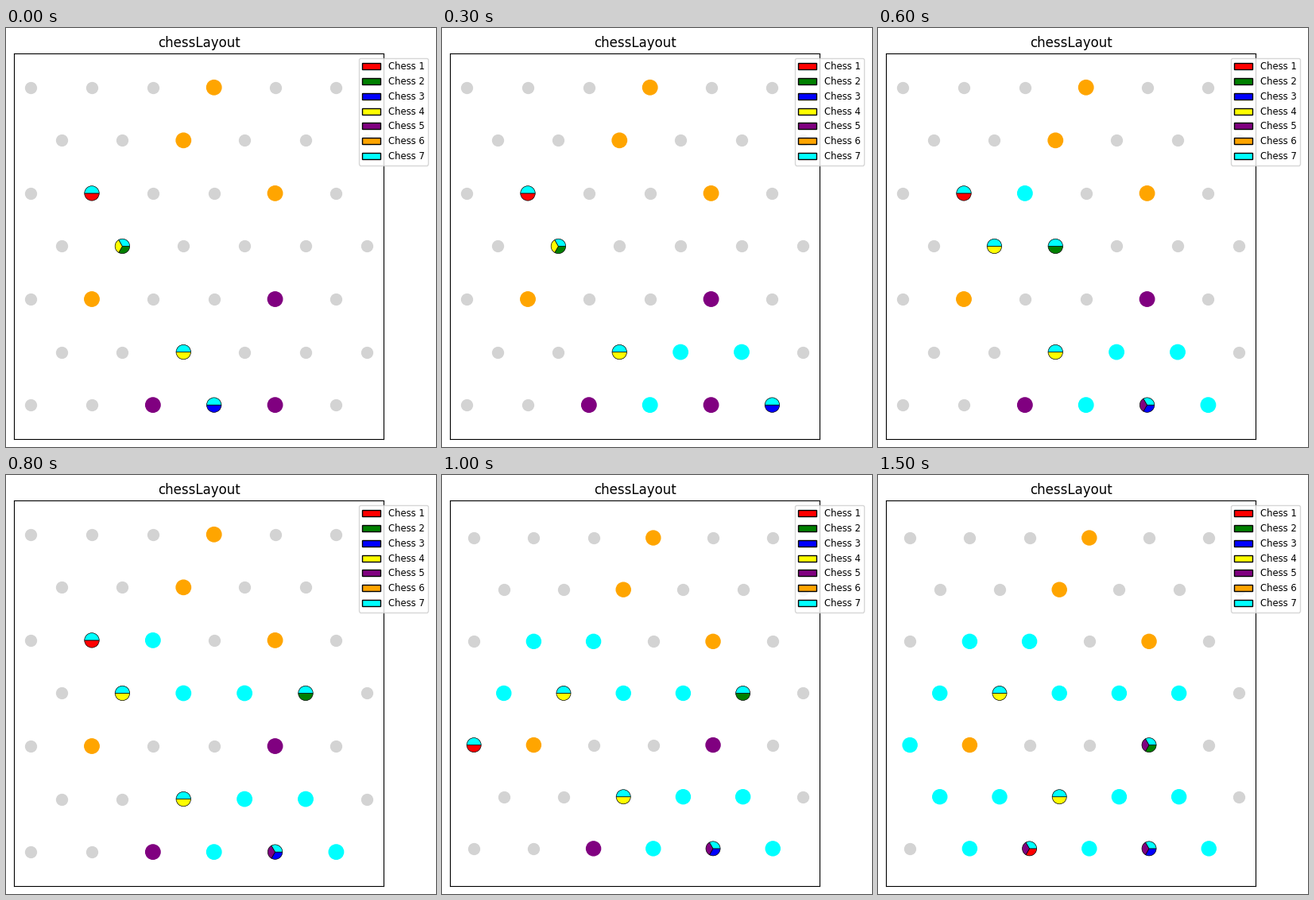
Animation of 541 by 527 pixels, one loop 1600 ms. Source, as a matplotlib script:

```python
import math

import matplotlib.pyplot as plt
from matplotlib.animation import FuncAnimation
from matplotlib.patches import Circle, Patch, Wedge

W, H, DPI = 541, 527, 100
AX_W, AX_H = 465, 485.1
COLS, ROWS = 6, 7
ROW_STEP = math.sqrt(3) / 2
RADIUS = 0.12
STEPS, STEP_MS = 16, 100
COLORS = ["red", "green", "blue", "yellow", "purple", "orange", "cyan"]
TRAIL = 7
TURN = 4  # most moves a piece makes before the next one goes

# Cells are (x, row); x counts columns, with odd rows shifted by a half.
HEADING = {"E": (1, 0), "W": (-1, 0),
           "NE": (0.5, 1), "SE": (0.5, -1), "SW": (-0.5, -1)}
FIXED = {
    4: [(1.5, 3), (2.5, 1)],
    5: [(2, 0), (4, 0), (4, 2)],
    6: [(3, 6), (2.5, 5), (4, 4), (1, 2)],
}
START = {3: (3, 0), 2: (1.5, 3), 1: (1, 4)}
ROUTES = {3: "NE E SE W", 2: "NE SE E E SW", 1: "SW SW SE E SW E"}


def move_list():
    """Let the pieces take turns until every route is used up."""
    left = {piece: route.split() for piece, route in ROUTES.items()}
    moves = []
    while any(left.values()):
        for piece, route in left.items():
            moves += [(piece, HEADING[name]) for name in route[:TURN]]
            left[piece] = route[TURN:]
    return moves


MOVES = move_list()


def board_at(step):
    """Map each occupied cell to the set of pieces on it."""
    pos = dict(START)
    trail = set(START.values()) | set(FIXED[4])
    for piece, (dx, dy) in MOVES[:step]:
        x, row = pos[piece]
        pos[piece] = (x + dx, row + dy)
        trail.add(pos[piece])
    board = {cell: {TRAIL} for cell in trail}
    for piece, cells in FIXED.items():
        for cell in cells:
            board.setdefault(cell, set()).add(piece)
    for piece, cell in pos.items():
        board[cell].add(piece)
    return board


def fit_view(board):
    left = min(0, min(x for x, _ in board) - RADIUS)
    right = COLS - 0.5
    pad = 0.05 * (right - left)
    ax.set_xlim(left - pad, right + pad)
    half = (right - left + 2 * pad) * AX_H / AX_W / 2
    mid = (ROWS - 1) * ROW_STEP / 2
    ax.set_ylim(mid - half, mid + half)


def draw_cell(cell, pieces):
    center = cell[0], cell[1] * ROW_STEP
    order = sorted(pieces)
    if len(order) == 1:
        ax.add_patch(Circle(center, RADIUS, color=COLORS[order[0] - 1]))
        return
    sweep = 360 / len(order)
    for i, piece in enumerate(order):
        end = 360 - i * sweep
        ax.add_patch(Wedge(center, RADIUS, end - sweep, end,
                           facecolor=COLORS[piece - 1],
                           edgecolor="black", linewidth=0.5))


def update(step):
    for patch in list(ax.patches):
        patch.remove()
    board = board_at(step)
    for cell, pieces in board.items():
        draw_cell(cell, pieces)
    fit_view(board)
    return ax.patches


plt.rcParams["font.family"] = "DejaVu Sans"
fig = plt.figure(figsize=(W / DPI, H / DPI), dpi=DPI, facecolor="white")
ax = fig.add_axes([10 / W, 10 / H, AX_W / W, AX_H / H])
ax.set_xticks([])
ax.set_yticks([])
ax.set_title("chessLayout", fontsize=12)

grid = [(col + row % 2 / 2, row * ROW_STEP)
        for row in range(ROWS) for col in range(COLS)]
ax.scatter(*zip(*grid), s=100, color="lightgray", zorder=0.5)

handles = [Patch(facecolor=color, edgecolor="black", label=f"Chess {i}")
           for i, color in enumerate(COLORS, 1)]
ax.legend(handles=handles, loc="upper left", bbox_to_anchor=(0.92, 1),
          fontsize="small")

anim = FuncAnimation(fig, update, frames=STEPS, init_func=lambda: update(0),
                     interval=STEP_MS, repeat=True, repeat_delay=0)
plt.show()
```
